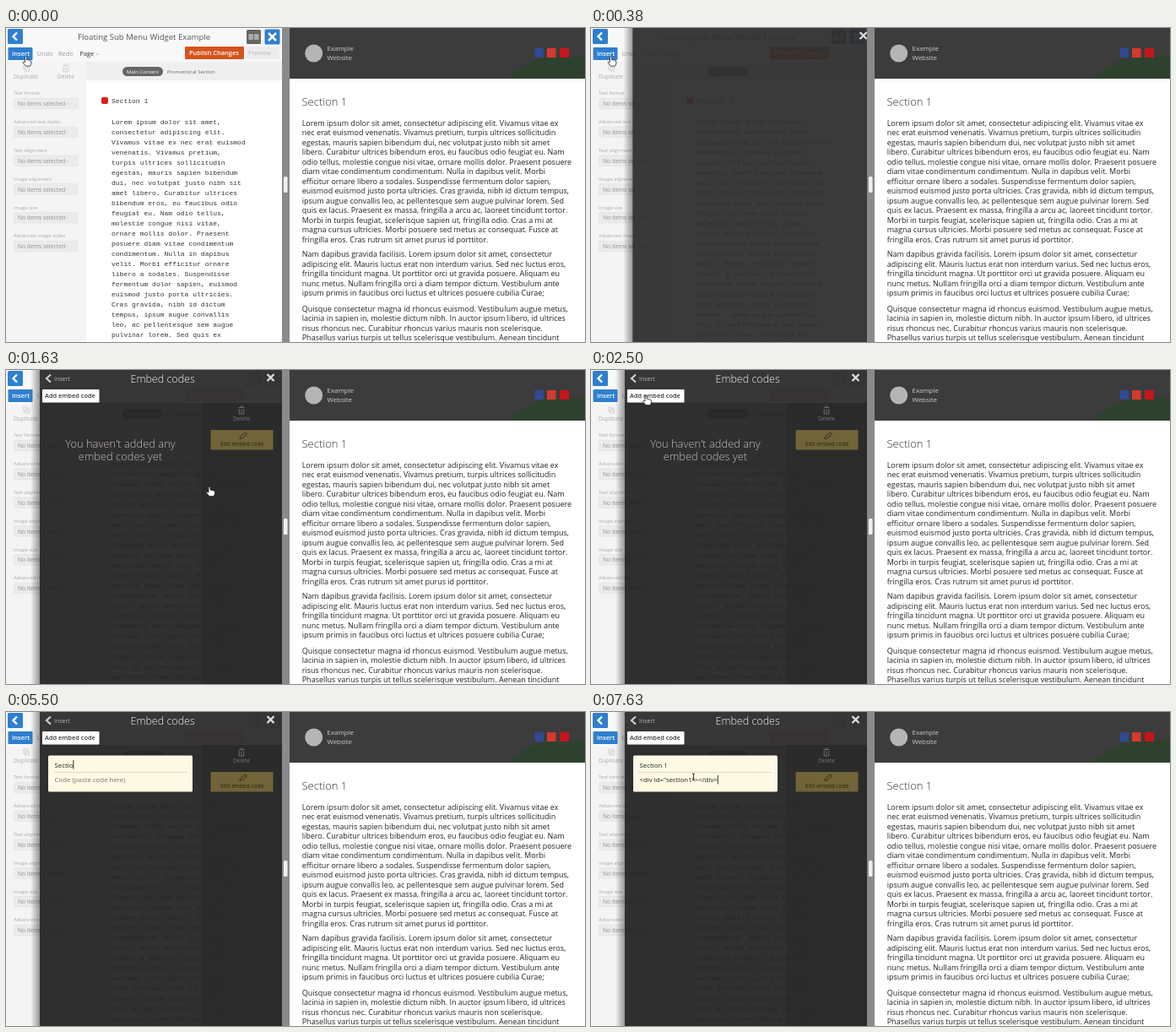
Write an HTML page that moves like this. It is 686 px wide and 372 px high and loops after 8 s.

```html
<!DOCTYPE html>
<html lang="en">
<head>
<meta charset="utf-8">
<title>Page editor</title>
<style>
html, body { margin: 0; width: 100%; height: 100%; overflow: hidden; background: #fff; }
svg { display: block; width: 686px; height: 372px; }
text { font-family: "Open Sans", sans-serif; white-space: pre; }
.mono text { font-family: "Liberation Mono", monospace; }
</style>
</head>
<body>
<svg id="stage" viewBox="0 0 686 372"></svg>
<script>
const LOOP = 8000, STEP = 125;
const stage = document.getElementById('stage');

const rect = (x, y, w, h, fill, r = 0, more = '') =>
  `<rect x="${x}" y="${y}" width="${w}" height="${h}" rx="${r}" fill="${fill}" ${more}/>`;
const text = (x, y, str, size, fill, more = '') =>
  `<text x="${x}" y="${y}" font-size="${size}" fill="${fill}" ${more}>${str}</text>`;
const line = (d, color, width, more = '') =>
  `<path d="${d}" fill="none" stroke="${color}" stroke-width="${width}" ${more}/>`;
const lines = (str, x, y, pitch, size, fill) =>
  str.trim().split('\n').map((s, i) => text(x, y + i * pitch, s, size, fill)).join('');
const mid = 'text-anchor="middle" ', bold = 'font-weight="600"', light = 'font-weight="300"';

const trash = (x, y, color) =>
  line(`M${x - 3.5} ${y - 3}h7M${x - 1.2} ${y - 4.5}h2.4M${x - 2.8} ${y - 1.5}v6h5.6v-6M${x} ${y - 1}v4`, color, 0.9);

const draft = `
Lorem ipsum dolor sit amet,
consectetur adipiscing elit.
Vivamus vitae ex nec erat euismod
venenatis. Vivamus pretium,
turpis ultrices sollicitudin
egestas, mauris sapien bibendum
dui, nec volutpat justo nibh sit
amet libero. Curabitur ultrices
bibendum eros, eu faucibus odio
feugiat eu. Nam odio tellus,
molestie congue nisi vitae,
ornare mollis dolor. Praesent
posuere diam vitae condimentum
condimentum. Nulla in dapibus
velit. Morbi efficitur ornare
libero a sodales. Suspendisse
fermentum dolor sapien, euismod
euismod justo porta ultricies.
Cras gravida, nibh id dictum
tempus, ipsum augue convallis
leo, ac pellentesque sem augue
pulvinar lorem. Sed quis ex`;

const paragraphs = [[115.6, `
Lorem ipsum dolor sit amet, consectetur adipiscing elit. Vivamus vitae ex
nec erat euismod venenatis. Vivamus pretium, turpis ultrices sollicitudin
egestas, mauris sapien bibendum dui, nec volutpat justo nibh sit amet
libero. Curabitur ultrices bibendum eros, eu faucibus odio feugiat eu. Nam
odio tellus, molestie congue nisi vitae, ornare mollis dolor. Praesent posuere
diam vitae condimentum condimentum. Nulla in dapibus velit. Morbi
efficitur ornare libero a sodales. Suspendisse fermentum dolor sapien,
euismod euismod justo porta ultricies. Cras gravida, nibh id dictum tempus,
ipsum augue convallis leo, ac pellentesque sem augue pulvinar lorem. Sed
quis ex lacus. Praesent ex massa, fringilla a arcu ac, laoreet tincidunt tortor.
Morbi in turpis feugiat, scelerisque sapien ut, fringilla odio. Cras a mi at
magna cursus ultricies. Morbi posuere sed metus ac consequat. Fusce at
fringilla eros. Cras rutrum sit amet purus id porttitor.`], [271.3, `
Nam dapibus gravida facilisis. Lorem ipsum dolor sit amet, consectetur
adipiscing elit. Mauris luctus erat non interdum varius. Sed nec luctus eros,
fringilla tincidunt magna. Ut porttitor orci ut gravida posuere. Aliquam eu
nunc metus. Nullam fringilla orci a diam tempor dictum. Vestibulum ante
ipsum primis in faucibus orci luctus et ultrices posuere cubilia Curae;`], [335.8, `
Quisque consectetur magna id rhoncus euismod. Vestibulum augue metus,
lacinia in sapien in, molestie dictum nibh. In auctor ipsum libero, id ultrices
risus rhoncus nec. Curabitur rhoncus varius mauris non scelerisque.
Phasellus varius turpis ut tellus scelerisque vestibulum. Aenean tincidunt`]];

const styles = ['Text format', 'Advanced text styles', 'Text alignment',
  'Image alignment', 'Image size', 'Advanced image styles'];

const editor = () =>
  rect(0, 0, 327, 40, '#f8f8f8') + rect(0, 40, 327, 332, '#f4f4f4') + rect(95, 40, 232, 22, '#efefef') +
  rect(95, 62, 232, 310, '#fff') +
  rect(2, 1, 18, 18, '#2f7fcf', 1.5) + line('M13 5.5L8.5 10L13 14.5', '#fff', 2.4) +
  rect(306.5, 1.5, 18, 18, '#2f7fcf', 1.5) + line('M311 6l9 9M320 6l-9 9', '#fff', 2.6) +
  rect(285, 2, 17, 17, '#666', 1.5) + rect(287.5, 7, 5.5, 7, '#aaa', 0.5) + rect(294, 7, 5.5, 7, '#aaa', 0.5) +
  text(85, 14, 'Floating Sub Menu Widget Example', 9.55, '#555') +
  rect(2.5, 23, 29, 15, '#2f7fcf', 1) + text(7, 33.2, 'Insert', 7.5, '#fff', bold) +
  text(36.5, 33.2, 'Undo', 7.4, '#999') + text(62, 33.2, 'Redo', 7.4, '#999') +
  text(87.5, 33.2, 'Page', 7.4, '#333') + line('M107 30l1.5 1.5l1.5-1.5', '#888', 0.7) +
  rect(212, 22, 70, 15, '#d4541d', 1) + text(217, 32.2, 'Publish Changes', 7.45, '#fff', bold) +
  rect(283, 22, 41, 15, '#ececec', 1) + text(287, 32.2, 'Preview', 7.4, '#bbb') +
  rect(138, 46, 48, 11, '#666', 5.5) + text(143, 53.9, 'Main Content', 6, '#fff') +
  text(191, 53.9, 'Promotional Section', 6, '#666') +
  line('M20.5 44h5v5h-5zM22.5 46h5v5h-5z', '#ccc', 0.8) + trash(71, 47.5, '#ccc') +
  text(9, 59.6, 'Duplicate', 6.6, '#aaa') + text(61, 59.6, 'Delete', 6.6, '#aaa') +
  styles.map((s, i) => {
    const y = 79.3 + i * 33.8;
    return text(9, y, s, 5.8, '#aaa') +
      rect(9.5, y + 4, 75.5, 12.5, '#ebebeb', 1, 'stroke="#e2e2e2" stroke-width=".7"') +
      text(14, y + 12.8, 'No items selected', 6.75, '#909090') +
      line(`M71 ${y + 9.8}l1.3 1.3l1.3-1.3`, '#bbb', 0.6);
  }).join('') +
  rect(113, 82, 8, 8, '#d7201c', 2) +
  `<g class="mono">${text(125, 88.8, 'Section 1', 8.03, '#333')}${lines(draft, 125, 113.7, 12, 8.03, '#333')}</g>`;

const tiles = [['Images'], ['Tables'], ['Mailing', 'lists'], ['Embed', 'codes'], ['Files']];
const chooser = () =>
  text(50.5, 34.5, 'What would you like to add to your page?', 12.4, '#fff', light) +
  rect(50, 53, 128, 27, '#646464', 1) + text(114, 69.4, 'Widget', 8.6, '#f0f0f0', mid) +
  rect(189, 53, 128, 27, '#646464', 1) + text(252.7, 69.4, 'Layout', 8.6, '#f0f0f0', mid) +
  text(50.5, 109, 'Storage', 7.7, '#ddd') +
  tiles.map((words, i) => rect(50 + i * 54, 117, 50.5, 38.5, '#646464', 1) +
    words.map((w, j) => text(75.3 + i * 54, 134.8 + j * 9, w, 8.1, '#f0f0f0', mid)).join('')).join('');

const codes = () =>
  rect(40, 0, 287, 39, '#363636', 0, 'opacity=".6"') + rect(40, 39, 192, 333, '#000', 0, 'opacity=".18"') +
  rect(232, 39, 95, 333, '#292929', 0, 'opacity=".85"') +
  line('M53 5.5L48 10L53 14.5', '#ccc', 2.2) + text(57, 12.7, 'Insert', 7, '#b5b5b5') +
  text(147.5, 14.6, 'Embed codes', 12.5, '#f4f4f4', light) +
  rect(43, 23, 67.5, 15.5, '#fff', 1) + text(46, 33.3, 'Add embed code', 7.4, '#333', bold) +
  trash(279, 47.5, '#777') + text(279, 59.6, 'Delete', 6.6, '#777', mid) +
  rect(242.5, 71, 74, 23.5, '#706438', 1) + text(279.5, 90.2, 'Edit embed code', 6.55, '#2a2617', mid) +
  line('M277 81.5l1-3l5.5-4.5l2 2l-5.5 4.5z', '#2a2617', 0.9) +
  `<g id="none">${text(135.5, 92, 'You haven\'t added any', 12.9, '#c0c0c0', mid + light)}` +
  `${text(135.5, 107, 'embed codes yet', 12.9, '#c0c0c0', mid + light)}</g>` +
  `<g id="form">${rect(50, 51.5, 171, 43, '#fdf9e3', 1.5)}` +
  line('M57 71.5H214', '#b3ab8d', 0.8, 'stroke-dasharray="1 1"') +
  text(57.5, 65.8, '', 7.85, '#777', 'id="name"') + text(57.5, 83.2, '', 7.85, '#777', 'id="code"') +
  `${rect(57.5, 57, 0.9, 10.5, '#222', 0, 'id="caret"')}</g>`;

const website = () =>
  rect(327, 0, 9, 372, '#8a8a8a') + rect(329, 176, 4.5, 19, '#f0f0f0', 1.5) +
  rect(336, 0, 350, 372, '#fff') + rect(336, 0, 350, 60, '#3c3c3c') +
  '<path d="M594 60Q618 36 646 35L686 33V60z" fill="#2e412e"/>' +
  '<circle cx="364.7" cy="30" r="10.5" fill="#b5b5b5"/>' +
  text(380.5, 27.2, 'Example', 7.9, '#ccc') + text(380.5, 38.2, 'Website', 7.9, '#ccc') +
  rect(626.5, 24, 10.5, 11, '#2f4a94') + rect(641, 24, 10.5, 11, '#d63a2c') + rect(656, 24, 11, 11, '#c5161b') +
  text(350.5, 92, 'Section 1', 13, '#333', light) +
  paragraphs.map(([y, s]) => lines(s, 350.7, y, 11.52, 9, '#222')).join('');

const outline = 'fill="#fff" stroke="#222" stroke-width=".8" stroke-linejoin="round"';
const cursors =
  `<path id="hand" ${outline} d="M-1 0.8Q0 -.6 1 .8V4.2Q2.2 3.6 2.8 4.6Q4.2 4 4.7 5.2Q6.3 4.8 6.4 6.5V8.5L5.2 11.6H0L-3.6 7.4Q-3.4 5.6 -1 7z"/>` +
  `<path id="arrow" ${outline} d="M0 0V10L2.3 7.8L3.9 11.4L5.5 10.7L3.9 7.2H7z"/>` +
  line('M-1.6 -4Q0 -4 0 -3Q0 -4 1.6 -4M0 -3V3M-1.6 4Q0 4 0 3Q0 4 1.6 4', '#222', 0.9, 'id="beam"');

stage.innerHTML = `
<defs><linearGradient id="shade"><stop offset="0" stop-opacity="0"/><stop offset="1" stop-opacity=".38"/></linearGradient></defs>
${editor()}
<g id="panel">${rect(29, 0, 11, 372, 'url(#shade)')}${rect(40, 0, 287, 372, '#2e2e2e', 0, 'opacity=".94"')}
<g id="chooser">${chooser()}</g><g id="codes">${codes()}</g>
${line('M309.5 5l8 8M317.5 5l-8 8', '#dcdcdc', 2.4)}</g>
${website()}
<g id="cursor">${cursors}</g>`;

const $ = id => document.getElementById(id);
const clamp = v => Math.min(1, Math.max(0, v));
const ramp = (t, a, b) => clamp((t - a) / (b - a));
const smooth = p => p * p * (3 - 2 * p);
const show = (id, on) => $(id).setAttribute('opacity', +on);
const move = (id, x, y) => $(id).setAttribute('transform', `translate(${x} ${y})`);

// time, x, y of the pointer's hot spot
const route = [[0, 23.5, 33.5], [600, 23.5, 33.5], [900, 54, 41], [1250, 241, 138],
  [1900, 241, 138], [2500, 65, 30], [4250, 65, 30], [4750, 138, 61],
  [6375, 138, 61], [7000, 121.5, 77], [LOOP, 121.5, 77]];
// start time and pointer shape
const shapes = [[0, 'hand'], [625, 'arrow'], [1125, 'hand'], [2000, 'arrow'],
  [2500, 'hand'], [4375, 'arrow'], [4625, 'beam']];

function pointer(t) {
  const i = route.findIndex(k => k[0] > t), [a, x, y] = route[i - 1], [b, x2, y2] = route[i];
  const p = smooth(ramp(t, a, b));
  move('cursor', x + (x2 - x) * p, y + (y2 - y) * p);
  show('cursor', t < 4875 || t >= 6375);
  const shape = shapes.filter(s => s[0] <= t).pop()[1];
  for (const id of ['hand', 'arrow', 'beam']) show(id, id === shape);
}

function field(id, value, hint) {
  $(id).textContent = value || hint;
  $(id).setAttribute('fill', value ? '#222' : '#777');
  return value ? $(id).getComputedTextLength() : 0;
}

function draw(t) {
  const slide = 1 - (1 - ramp(t, 100, 500)) ** 3;
  move('panel', 301 * (1 - slide), 0);
  const swap = ramp(t, 1250, 1600);
  show('panel', t >= STEP);
  $('chooser').setAttribute('opacity', ramp(t, 400, 700) * (1 - swap));
  $('codes').setAttribute('opacity', swap);
  show('none', t < 4125);
  show('form', t >= 4125);

  const typed = t >= 6000 ? 9 : Math.min(8, Math.max(0, Math.floor((t - 4875) / STEP) + 1));
  const nameEnd = field('name', 'Section 1'.slice(0, typed), 'Name (not public)');
  const codeEnd = field('code', t >= 7500 ? '<div id="section1"></div>' : '', 'Code (paste code here)');
  const inCode = t >= 6875;
  move('caret', inCode ? codeEnd : nameEnd, inCode ? 18 : 0);
  pointer(t);
}

let start;
function tick(now) {
  start ??= now;
  const t = (now - start) % LOOP;
  draw(Math.floor((t + 1) / STEP) * STEP % LOOP);
  requestAnimationFrame(tick);
}
draw(0);
requestAnimationFrame(tick);
</script>
</body>
</html>
```
